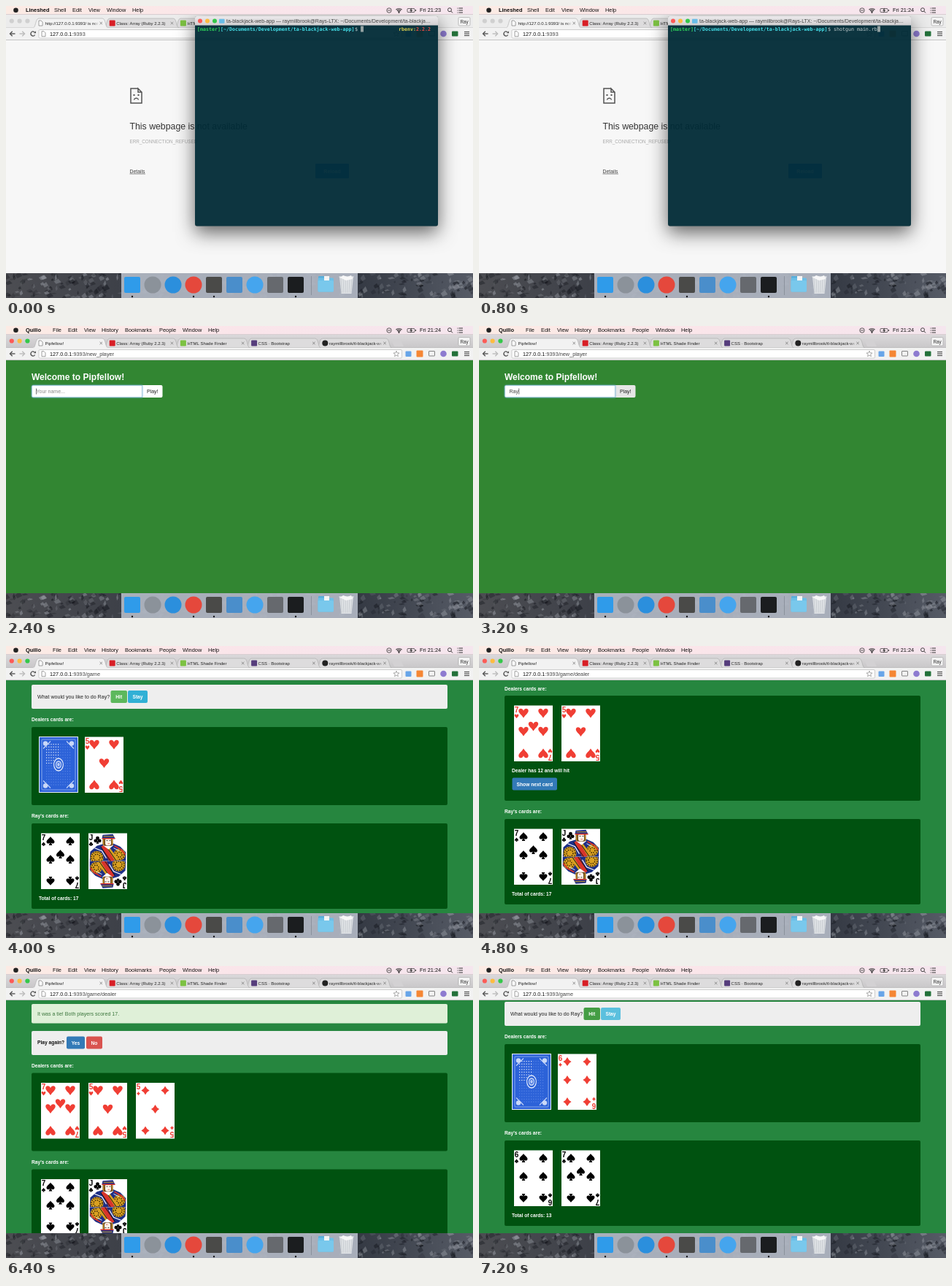
Write an HTML page with a canvas that moves like this. It is 640 px wide and 400 px high and loops after 8000 ms.

```html
<!DOCTYPE html>
<html lang="en">
<head>
<meta charset="utf-8">
<title>Card game demo</title>
<style>
html, body { margin: 0; width: 100%; height: 100%; overflow: hidden; }
canvas { display: block; }
</style>
</head>
<body>
<canvas id="stage" width="640" height="400"></canvas>
<script>
const ctx = document.getElementById('stage').getContext('2d');
const SANS = '"Liberation Sans", Arial, sans-serif';
const MONO = '"DejaVu Sans Mono", monospace';
const STEP = 800, STEPS = 10;
const PLAYER = 'Ray', GAME = 'Pipfellow!';

function rect(x, y, w, h, fill) {
  ctx.fillStyle = fill;
  ctx.fillRect(x, y, w, h);
}
function round(x, y, w, h, r, fill, stroke, width = 1) {
  ctx.beginPath();
  ctx.roundRect(x, y, w, h, r);
  if (fill) { ctx.fillStyle = fill; ctx.fill(); }
  if (stroke) { ctx.strokeStyle = stroke; ctx.lineWidth = width; ctx.stroke(); }
}
function disc(x, y, r, fill) {
  ctx.fillStyle = fill;
  ctx.beginPath();
  ctx.arc(x, y, r, 0, 7);
  ctx.fill();
}
function poly(fill, ...p) {
  ctx.fillStyle = fill;
  ctx.beginPath();
  for (let i = 0; i < p.length; i += 2) ctx.lineTo(p[i], p[i + 1]);
  ctx.fill();
}
function line(color, width, ...p) {
  ctx.strokeStyle = color;
  ctx.lineWidth = width;
  ctx.beginPath();
  for (let i = 0; i < p.length; i += 2) ctx.lineTo(p[i], p[i + 1]);
  ctx.stroke();
}
function arc(x, y, r, from, to, color, width) {
  ctx.strokeStyle = color;
  ctx.lineWidth = width;
  ctx.beginPath();
  ctx.arc(x, y, r, from, to);
  ctx.stroke();
}
function text(str, x, y, size, color, weight = '', align = 'left', family = SANS) {
  ctx.font = `${weight} ${size}px ${family}`;
  ctx.textAlign = align;
  ctx.fillStyle = color;
  ctx.fillText(str, x, y);
}
function gradient(x0, y0, x1, y1, ...colors) {
  const g = ctx.createLinearGradient(x0, y0, x1, y1);
  colors.forEach((c, i) => g.addColorStop(i / (colors.length - 1), c));
  return g;
}
function at(x, y, angle, draw) {
  ctx.save();
  ctx.translate(x, y);
  ctx.rotate(angle);
  draw();
  ctx.restore();
}
function clipped(x, y, w, h, draw) {
  ctx.save();
  ctx.beginPath();
  ctx.rect(x, y, w, h);
  ctx.clip();
  draw();
  ctx.restore();
}

// Desktop

function menuBar(app, items, clock) {
  rect(0, 0, 640, 12, gradient(0, 0, 640, 0, '#fcebe4', '#fae5ea', '#f5e6ee'));
  rect(0, 11, 640, 1, '#d9cdd1');
  disc(13.5, 5.8, 3.3, '#222');
  text(app, 27, 8.2, 7.4, '#111', 'bold');
  for (const [name, x] of items) text(name, x, 8.2, 7.4, '#111');
  arc(525, 6, 3.2, 0, 7, '#333', .8);
  line('#333', .8, 523, 6, 527, 6);
  for (const r of [2, 4, 6]) arc(538.5, 9.5, r, -2.3, -.84, '#333', 1.1);
  disc(538.5, 9, .9, '#333');
  round(550, 3.5, 10, 5, 1, null, '#333', .7);
  rect(561, 5, 1, 2, '#333');
  poly('#333', 556, 2.5, 553, 6.4, 555, 6.4, 554, 9.5, 557.5, 5.5, 555.5, 5.5);
  text(clock, 567, 8.2, 7.4, '#111');
  arc(608, 5.2, 2.5, 0, 7, '#333', .9);
  line('#333', 1, 610, 7.2, 612, 9.4);
  for (const y of [3, 6, 9]) {
    disc(619, y, .6, '#333');
    line('#333', 1, 620.5, y, 626, y);
  }
}

function wallpaper() {
  let seed = 11;
  const rnd = () => (seed = seed * 16807 % 2147483647) / 2147483647;
  rect(0, 366, 640, 34, gradient(0, 0, 640, 0, '#4c4d52', '#3d4048', '#30343d', '#343943', '#565b66'));
  for (let i = 0; i < 420; i++) {
    const x = rnd() * 650 - 10, y = 366 + rnd() * 34, w = 2 + rnd() * 9, h = 1 + rnd() * 4;
    const tone = rnd() < .55 ? '14,16,22' : '158,162,170';
    poly(`rgba(${tone},${.15 + rnd() * .35})`, x, y, x + w * .6, y - h, x + w, y + h * .3, x + w * .3, y + h);
  }
}

function dock() {
  clipped(0, 366, 640, 34, wallpaper);
  rect(158, 366, 324, 34, 'rgba(176,182,194,.94)');
  const icons = [
    [173, '#2f9bea', 1], [201, '#8b929a', 0], [229, '#2b8fdd', 0], [257, '#e5483c', 0], [285, '#4a4a48', 1],
    [313, '#4a8ecb', 1], [341, '#45a5ee', 0], [369, '#66696e', 1], [397, '#1b1d1f', 1]
  ];
  for (const [x, color, square] of icons) {
    if (square) round(x - 11, 371, 22, 22, 2, color);
    else disc(x, 382, 11.5, color);
  }
  for (const x of [173, 257, 285, 397]) disc(x, 398, 1.2, '#15171a');
  line('#858b96', .8, 418.5, 370, 418.5, 396);
  round(428, 370, 9, 6, 1, '#58aedb');
  round(427.5, 372.5, 21.5, 19, 1.5, '#6bbfe7');
  round(436, 370, 7, 8, 0, '#f5f5f5');
  round(427.5, 376, 21.5, 15.5, 1.5, '#79c8ec');
  poly('#e1e4e7', 457, 371, 476, 371, 473.5, 394, 459.5, 394);
  for (let i = 0; i < 6; i++) line('#b4b9bf', .6, 459 + i * 3, 373, 460.5 + i * 2.4, 393);
  poly('#f8f8f8', 458, 372, 462, 369, 468, 371, 473, 369, 475, 374, 466, 376);
  line('#f5f6f7', 1, 456.5, 371, 476.5, 371);
}

// Browser window

function pageIcon(x, y) {
  ctx.fillStyle = '#fff';
  ctx.strokeStyle = '#777';
  ctx.lineWidth = .7;
  ctx.beginPath();
  ctx.moveTo(x, y); ctx.lineTo(x + 3, y); ctx.lineTo(x + 5, y + 2);
  ctx.lineTo(x + 5, y + 7); ctx.lineTo(x, y + 7); ctx.closePath();
  ctx.fill(); ctx.stroke();
}

function tab(i, title, front) {
  const x = 40 + i * 97.2, bg = front ? '#f2f2f2' : '#dddcdd';
  ctx.beginPath();
  ctx.moveTo(x - 3, 30);
  ctx.bezierCurveTo(x + 1, 30, x, 17, x + 5, 17);
  ctx.lineTo(x + 92, 17);
  ctx.bezierCurveTo(x + 97, 17, x + 96, 30, x + 100, 30);
  ctx.fillStyle = bg;
  ctx.fill();
  ctx.strokeStyle = '#aaa';
  ctx.lineWidth = .6;
  ctx.stroke();
  if (i === 0) pageIcon(x + 5, 20);
  else if (i === 4) disc(x + 8.5, 23.5, 4, '#222');
  else round(x + 4.5, 19.5, 8, 8, 1, ['#d81f26', '#7cc242', '#563d7c'][i - 1]);
  const tx = x + (i === 0 ? 13.5 : 14);
  clipped(tx - 1, 17, x + 87.5 - tx, 12, () =>
    text(title, tx, 25.5, 6, gradient(x + 80, 0, x + 87, 0, '#222', bg)));
  line('#777', .8, x + 88.5, 21.8, x + 92, 25.2);
  line('#777', .8, x + 92, 21.8, x + 88.5, 25.2);
}

function browser(title, path, active) {
  rect(0, 12, 640, 18, active ? gradient(0, 12, 0, 30, '#dad8da', '#c9c7c9') : '#ececec');
  const lights = active ? ['#fc5b57', '#fdbc40', '#34c84a'] : ['#d0d0d0', '#d0d0d0', '#d0d0d0'];
  lights.forEach((c, i) => disc(7.8 + i * 10.8, 20.5, 3.1, c));
  poly('#d3d1d3', 528, 19, 541, 19, 545, 28, 532, 28);
  tab(4, 'raymillbrook/tl-blackjack-web', false);
  tab(3, 'CSS · Bootstrap', false);
  tab(2, 'HTML Shade Finder', false);
  tab(1, 'Class: Array (Ruby 2.2.3)', false);
  line('#aaa', .6, 0, 30, 640, 30);
  rect(0, 30, 640, 17, '#f2f2f2');
  tab(0, title, true);
  rect(37, 29.6, 103, 1.2, '#f2f2f2');
  round(620, 15.5, 16, 11.5, 1.5, '#f3f3f3', '#aaa', .7);
  text(PLAYER, 628, 23.5, 6.3, '#333', '', 'center');

  const arrow = (x, dir, color) => {
    line(color, 1.4, x - 3.5, 38, x + 3.5, 38);
    line(color, 1.4, x + dir * .3, 34.8, x + dir * 3.5, 38, x + dir * .3, 41.2);
  };
  arrow(9, -1, '#555');
  arrow(22, 1, '#bbb');
  arc(37, 38, 3, .5, 5.5, '#555', 1.3);
  poly('#555', 38, 37.2, 41, 37.2, 41, 34.2);
  round(45, 32.5, 497.5, 11.5, 1.5, '#fff', '#b9b9b9', .7);
  pageIcon(49, 34.7);
  const host = '127.0.0.1';
  text(host, 60, 40.8, 7.3, '#111');
  text(':9393' + path, 60 + ctx.measureText(host).width, 40.8, 7.3, '#444');
  ctx.beginPath();
  for (let i = 0; i < 10; i++) {
    const a = i * Math.PI / 5 - Math.PI / 2, r = i % 2 ? 1.8 : 4.2;
    ctx.lineTo(535 + r * Math.cos(a), 38.3 + r * Math.sin(a));
  }
  ctx.closePath();
  ctx.strokeStyle = '#888';
  ctx.lineWidth = .7;
  ctx.stroke();
  round(547.5, 34.5, 8, 7.5, 1, '#68a5e8');
  round(562.5, 33.5, 9, 9, 1, '#f58634');
  round(579.5, 34.5, 8, 6.5, .5, null, '#777', .9);
  disc(599.5, 38, 4.3, '#8d7bd0');
  round(611, 34.5, 8.5, 7, 1, '#23713a');
  for (const y of [35.5, 38, 40.5]) line('#555', 1.2, 628, y, 635, y);
  rect(0, 46, 640, 1, '#c4c4c4');
}

function errorPage() {
  rect(0, 47, 640, 319, '#f7f7f7');
  line('#535353', 1.5, 181, 113, 171, 113, 171, 133, 186, 133, 186, 118, 181, 113, 181, 118, 186, 118);
  rect(174.5, 121, 2, 2, '#535353');
  rect(180.5, 121, 2, 2, '#535353');
  arc(178.5, 129.5, 3.2, Math.PI + .3, -.3, '#535353', 1.4);
  text('This webpage is not available', 169.5, 168.5, 12.3, '#333');
  text('ERR_CONNECTION_REFUSED', 169.5, 187.5, 6.3, '#aaa');
  text('Details', 169.5, 228.5, 6.9, '#444');
  line('#444', .6, 169.5, 230, 191, 230);
  round(424, 216, 46, 20, 1, '#4285f4');
  text('Reload', 447, 228.5, 7, '#fff', 'bold', 'center');
}

// Console window

function consoleWindow(title, titleX, command, log) {
  clipped(0, 12, 640, 354, () => {
    ctx.save();
    // The shadow falls only outside the translucent window.
    ctx.beginPath();
    ctx.rect(0, 12, 640, 354);
    ctx.roundRect(259, 14, 333, 287.5, 3);
    ctx.clip('evenodd');
    ctx.shadowColor = 'rgba(0,0,0,.6)';
    ctx.shadowBlur = 26;
    ctx.shadowOffsetY = 9;
    round(259, 14, 333, 287.5, 3, '#000');
    ctx.restore();
    round(259, 26, 333, 275.5, [0, 0, 3, 3], 'rgba(0,43,54,.95)');
    round(259, 14, 333, 12.5, [3, 3, 0, 0], gradient(0, 14, 0, 26, '#ebe9eb', '#d2d0d2'));
  });
  ['#fc5b57', '#fdbc40', '#34c84a'].forEach((c, i) => disc(266 + i * 10, 20.5, 3, c));
  round(titleX - 10, 17.8, 7.5, 6, .8, '#69bde8');
  text(title, titleX, 23, 7, '#444');

  const cell = 4, rowHeight = 8.4;
  const put = (str, col, row, color, weight = '') =>
    text(str, 262 + col * cell, 34 + row * rowHeight, 6.645, color, weight, 'left', MONO);
  const cursor = (col, row) => rect(262 + col * cell, 27.5 + row * rowHeight, 4, 8, '#93a1a1');
  put('[master]', 0, 0, '#2fd65b', 'bold');
  put('[~/Documents/Development/ta-blackjack-web-app]', 8, 0, '#45dfe8', 'bold');
  put('$', 54, 0, '#c4d4d4');
  put(command, 56, 0, '#c4cfcf');
  if (!command) {
    put('rbenv:', 69, 0, '#d8cd4e', 'bold');
    put('2.2.2', 75, 0, '#ee4b42', 'bold');
  }
  if (log) {
    log.forEach((row, i) => put(row, 0, i + 1, '#b9c4c4'));
    cursor(0, log.length + 1);
  } else {
    cursor(56 + command.length, 0);
  }
}

// Playing cards

function pip(suit, x, y, size, flip) {
  at(x, y, flip ? Math.PI : 0, () => {
    ctx.scale(size / 12, size / 12);
    ctx.fillStyle = 'HD'.includes(suit) ? '#f03e34' : '#000';
    ctx.beginPath();
    if (suit === 'D') {
      ctx.moveTo(0, -6);
      ctx.quadraticCurveTo(1.8, -1.8, 5.6, 0);
      ctx.quadraticCurveTo(1.8, 1.8, 0, 6);
      ctx.quadraticCurveTo(-1.8, 1.8, -5.6, 0);
      ctx.quadraticCurveTo(-1.8, -1.8, 0, -6);
    } else if (suit === 'C') {
      for (const [cx, cy] of [[0, -3], [-3.2, 1.3], [3.2, 1.3]]) {
        ctx.moveTo(cx, cy);
        ctx.arc(cx, cy, 2.9, 0, 7);
      }
    } else if (suit === 'S') {
      ctx.moveTo(0, -6);
      ctx.bezierCurveTo(-1.3, -3.4, -5.5, -1.4, -5.5, 1.3);
      ctx.bezierCurveTo(-5.5, 4.3, -1.4, 4.3, 0, 1.8);
      ctx.bezierCurveTo(1.4, 4.3, 5.5, 4.3, 5.5, 1.3);
      ctx.bezierCurveTo(5.5, -1.4, 1.3, -3.4, 0, -6);
    } else {
      ctx.moveTo(0, 6);
      ctx.bezierCurveTo(-2, 2.5, -6.2, 0, -6.2, -3);
      ctx.bezierCurveTo(-6.2, -6.8, -1, -6.8, 0, -3);
      ctx.bezierCurveTo(1, -6.8, 6.2, -6.8, 6.2, -3);
      ctx.bezierCurveTo(6.2, 0, 2, 2.5, 0, 6);
    }
    ctx.fill();
    if ('SC'.includes(suit)) poly('#000', 0, .5, 2.3, 6, -2.3, 6);
  });
}

function courtHalf(suit) {
  const gold = '#d9a021', red = '#d8342c', navy = '#1d2f86';
  poly(navy, -25, 0, -24, -13, -15, -21, -5, -24, 8, -24, 17, -20, 25, -12, 25, 0);
  for (const [x, y, r] of [[-15, -5, 9], [16, -9, 8]]) {
    disc(x, y, r, gold);
    for (const ring of [r - 1.5, r - 4.5]) {
      ctx.setLineDash([1.5, 1.5]);
      arc(x, y, ring, 0, 7, '#3a2708', 1.5);
    }
    ctx.setLineDash([]);
  }
  poly(red, -9, -20, -4, -23, 10, -5, 8, 0, 2, 0);
  poly(gold, -4, -23, 0, -22, 15, -2, 10, 0);
  line('#111', 1, -10, -20, 4, 0);
  line('#111', 1, -4, -23, 12, 0);
  line('#fff', 1.2, -18, -18, -8, -14, -2, -4);
  line(red, 1.8, 9, -21, 18, -16, 24, -9);
  line('#fff', .9, 8, -18, 16, -14);
  poly('#fff', -7, -22, 8, -22, 1, -16);
  round(-7, -32, 14, 11, 3, '#6f4a20');
  line(gold, 1, -5.5, -30, -6, -22);
  line(gold, 1, 6, -30, 6.5, -22);
  round(-3.5, -32, 8, 10.5, 3, '#fdf4e8');
  poly(navy, -8, -31, -7, -36, 7, -37, 10, -31);
  line(red, 1.6, -8, -31, 10, -31);
  line(gold, 1, -6, -34, 8, -34);
  line('#111', .8, -2, -28.2, 0, -28.2);
  line('#111', .8, 2, -28.2, 4, -28.2);
  line(red, .7, 0, -24, 2.5, -24);
  pip(suit, -14, -29, 10);
}

function card(code, x, y) {
  const [rank, suit] = code, red = 'HD'.includes(suit);
  rect(x, y, 53, 76.5, '#fff');
  for (const turn of [0, Math.PI]) {
    at(x + 26.5, y + 38.25, turn, () => {
      if (rank === 'J') clipped(-25, -38, 50, 38.1, () => courtHalf(suit));
      text(rank, -23, -29, 10, red ? '#f03e34' : '#000', 'bold', 'center');
      pip(suit, -23, -23.5, 5.5);
    });
  }
  if (rank === 'J') return;
  const size = suit === 'H' ? 13 : 12;
  for (const dx of [13, 40]) {
    pip(suit, x + dx, y + 10.5, size);
    if (rank !== '5') pip(suit, x + dx, y + 35.5, size);
    pip(suit, x + dx, y + 65.5, size, true);
  }
  if (rank !== '6') pip(suit, x + 26.5, y + (rank === '7' ? 28.5 : 36), size);
}

function cardBack(x, y) {
  rect(x, y, 54, 77, '#e9effc');
  rect(x + 1, y + 1, 52, 75, '#2c62d8');
  round(x + 4, y + 4, 46, 69, 1, null, '#9bb7f2', .8);
  for (let i = 0; i < 11; i++)
    for (let j = 0; j < 16; j++)
      rect(x + 10 + i * 3.2, y + 10 + j * 3.7, 1.2, 1.2, i < 6 && j < 8 ? '#e9effc' : '#5683e6');
  at(x + 27, y + 38.5, 0, () => {
    for (const sx of [-1, 1])
      for (const sy of [-1, 1]) {
        disc(sx * 18, sy * 29, 3.2, '#c9d8f8');
        line('#c9d8f8', 1.1, sx * 21, sy * 22, sx * 16, sy * 27, sx * 11, sy * 32);
      }
    ctx.scale(.75, 1);
    disc(0, 0, 10, '#2c62d8');
    arc(0, 0, 8.5, 0, 7, '#e9effc', 1.5);
    disc(0, 0, 5.5, '#b9ccf6');
    arc(0, 0, 3, 0, 7, '#2c62d8', 1.2);
  });
}

// Game pages

const white = (str, x, y) => text(str, x, y, 6.65, '#fff', 'bold');
const felt = color => rect(0, 47, 640, 319, color);
const panel = (y, h) => round(35, y, 570, h, 2, '#005210');

function button(x, y, w, str, color) {
  round(x, y, w, 17, 2, color);
  text(str, x + w / 2, y + 11, 6.7, '#fff', 'bold', 'center');
}
function cards(codes, y) {
  codes.forEach((code, i) => card(code, 48 + i * 65, y));
}
function playerHand(y, codes, total) {
  white(PLAYER + "'s cards are:", 35, y - 8);
  panel(y, 117);
  cards(codes, y + 13.5);
  white('Total of cards: ' + total, 45, y + 105);
}

function namePage(name) {
  felt('#328632');
  text('Welcome to ' + GAME, 35, 74, 12, '#fff', 'bold');
  round(187, 81, 27.5, 17, [0, 2, 2, 0], name ? '#e6e6e6' : '#fff');
  ctx.save();
  ctx.shadowColor = 'rgba(102,175,233,.6)';
  ctx.shadowBlur = 2;
  round(35.3, 81.3, 151.5, 16.5, [2, 0, 0, 2], '#fff', '#8ab9d6', .6);
  ctx.restore();
  text(name || 'Your name...', 41.5, 92, 7, name ? '#444' : '#888');
  const caret = name ? 42 + ctx.measureText(name).width : 41.3;
  rect(caret, 85.5, .7, 8, '#333');
  text('Play!', 200.7, 92, 7, '#222', '', 'center');
}

function turnPage(top, dealerCard, hand, total, hover) {
  felt('#26863f');
  round(35, top, 570, 33, 2, '#eeeeee');
  text(`What would you like to do ${PLAYER}?`, 43, top + 18.8, 7.08, '#222');
  button(143.5, top + 8, 22.5, 'Hit', hover === 'Hit' ? '#449d44' : '#5cb85c');
  button(167, top + 8, 27, 'Stay', hover === 'Stay' ? '#31b0d5' : '#5bc0de');
  white('Dealers cards are:', 35, top + 50);
  panel(top + 58, 107);
  cardBack(45, top + 71);
  card(dealerCard, 108, top + 71.5);
  playerHand(top + 190, hand, total);
}

function dealerPage(hover) {
  felt('#26863f');
  white('Dealers cards are:', 35, 60.5);
  panel(68, 144);
  cards(['7H', '5H'], 81.5);
  white('Dealer has 12 and will hit', 45, 173);
  button(45.5, 180.5, 61.5, 'Show next card', hover ? '#286090' : '#337ab7');
  playerHand(237, ['7S', 'JC'], 17);
}

function tiePage() {
  felt('#26863f');
  round(35, 52, 570, 26.5, 2, '#dff0d8');
  text('It was a tie! Both players scored 17.', 43, 68, 7.08, '#3c763d');
  round(35, 89, 570, 33, 2, '#eeeeee');
  text('Play again?', 43, 107.3, 6.7, '#111', 'bold');
  button(83, 96.5, 25, 'Yes', '#337ab7');
  button(110, 96.5, 22, 'No', '#d9534f');
  white('Dealers cards are:', 35, 138.5);
  panel(146.5, 107);
  cards(['7H', '5H', '5D'], 160);
  playerHand(278.5, ['7S', 'JC'], 17);
}

const consoleMenu = [['Shell', 66], ['Edit', 91], ['View', 113], ['Window', 138], ['Help', 173]];
const browserMenu = [['File', 64], ['Edit', 85], ['View', 107], ['History', 131], ['Bookmarks', 163],
  ['People', 210], ['Window', 242], ['Help', 277]];
const shellTitle = 'ta-blackjack-web-app — raymillbrook@Rays-LTX: ~/Documents/Development/ta-blackja…';
const serverTitle = 'ta-blackjack-web-app — shotgun main.rb — shotgun — ruby — Solarized Dark ansi — 82×32';
const command = 'shotgun main.rb';
const stamp = '[2015-10-09 21:24:12] INFO  ';
const serverLog = [
  '== Shotgun/WEBrick on http://127.0.0.1:9393/',
  stamp + 'WEBrick 1.3.1',
  stamp + 'ruby 2.2.2 (2015-04-13) [x86_64-darwin14]',
  stamp + 'WEBrick::HTTPServer#start: pid=4347 port=9393'
];

function consoleScene(clock, ...content) {
  errorPage();
  browser('http://127.0.0.1:9393/ is not available', '', false);
  dock();
  menuBar('Lineshed', consoleMenu, clock);
  consoleWindow(...content);
}
function browserScene(path, page, clock = 'Fri 21:24') {
  page();
  browser(GAME, path, true);
  dock();
  menuBar('Quillo', browserMenu, clock);
}

const firstTurn = () => turnPage(53, '5H', ['7S', 'JC'], 17, 'Stay');
const nextTurn = () => turnPage(49, '6D', ['6S', '7S'], 13, 'Hit');
const scenes = [
  () => consoleScene('Fri 21:23', shellTitle, 302, ''),
  () => consoleScene('Fri 21:24', shellTitle, 302, command),
  () => consoleScene('Fri 21:24', serverTitle, 300, command, serverLog),
  () => browserScene('/new_player', () => namePage('')),
  () => browserScene('/new_player', () => namePage(PLAYER)),
  () => browserScene('/game', firstTurn),
  () => browserScene('/game/dealer', () => dealerPage(false)),
  () => browserScene('/game/dealer', () => dealerPage(true)),
  () => browserScene('/game/dealer', tiePage),
  () => browserScene('/game', nextTurn, 'Fri 21:25')
];

const start = performance.now();
let shown = -1;
function tick() {
  const step = Math.floor((performance.now() - start) / STEP) % STEPS;
  if (step !== shown) {
    shown = step;
    ctx.clearRect(0, 0, 640, 400);
    scenes[step]();
  }
  requestAnimationFrame(tick);
}
tick();
</script>
</body>
</html>
```
